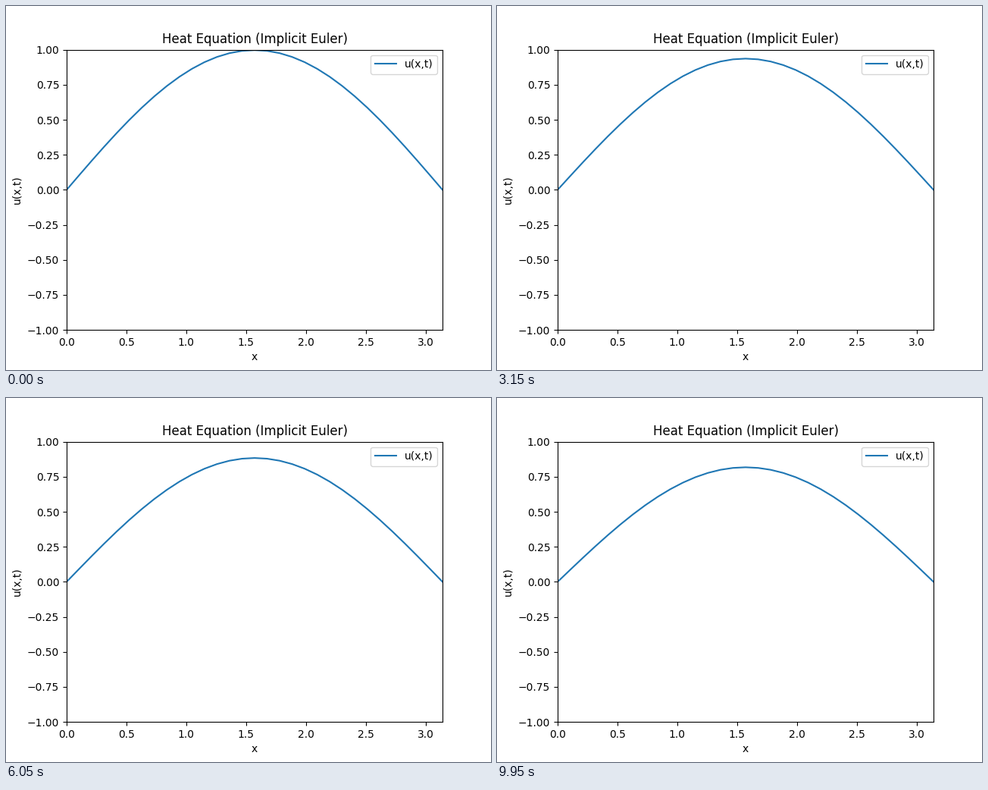
Write a matplotlib script that moves like this. It is 640 by 480 pixels and loops after 10000 ms.

```python
import numpy as np
import matplotlib.pyplot as plt
from matplotlib.animation import FuncAnimation

FRAMES = 200
INTERVAL = 50
CELLS = 30
DT = 0.001
LEAD_STEPS = 3  # time steps already taken when the loop starts

x = np.linspace(0, np.pi, CELLS + 1)
dx = x[1] - x[0]

# sin(x) is an eigenvector of the discrete Laplacian, so each implicit
# Euler step only scales it by a constant factor.
eigenvalue = (2 - 2 * np.cos(dx)) / dx**2
step_factor = 1 / (1 + DT * eigenvalue)


def solution(frame):
    return np.sin(x) * step_factor ** (frame + LEAD_STEPS)


fig, ax = plt.subplots(figsize=(6.4, 4.8), dpi=100)
line, = ax.plot(x, solution(0), label="u(x,t)")
ax.set_xlim(0, np.pi)
ax.set_ylim(-1, 1)
ax.set_xlabel("x")
ax.set_ylabel("u(x,t)")
ax.set_title("Heat Equation (Implicit Euler)")
ax.legend(loc="upper right")


def update(frame):
    line.set_ydata(solution(frame))
    return line,


anim = FuncAnimation(fig, update, frames=FRAMES, interval=INTERVAL,
                     repeat=True, repeat_delay=0)
plt.show()
```
